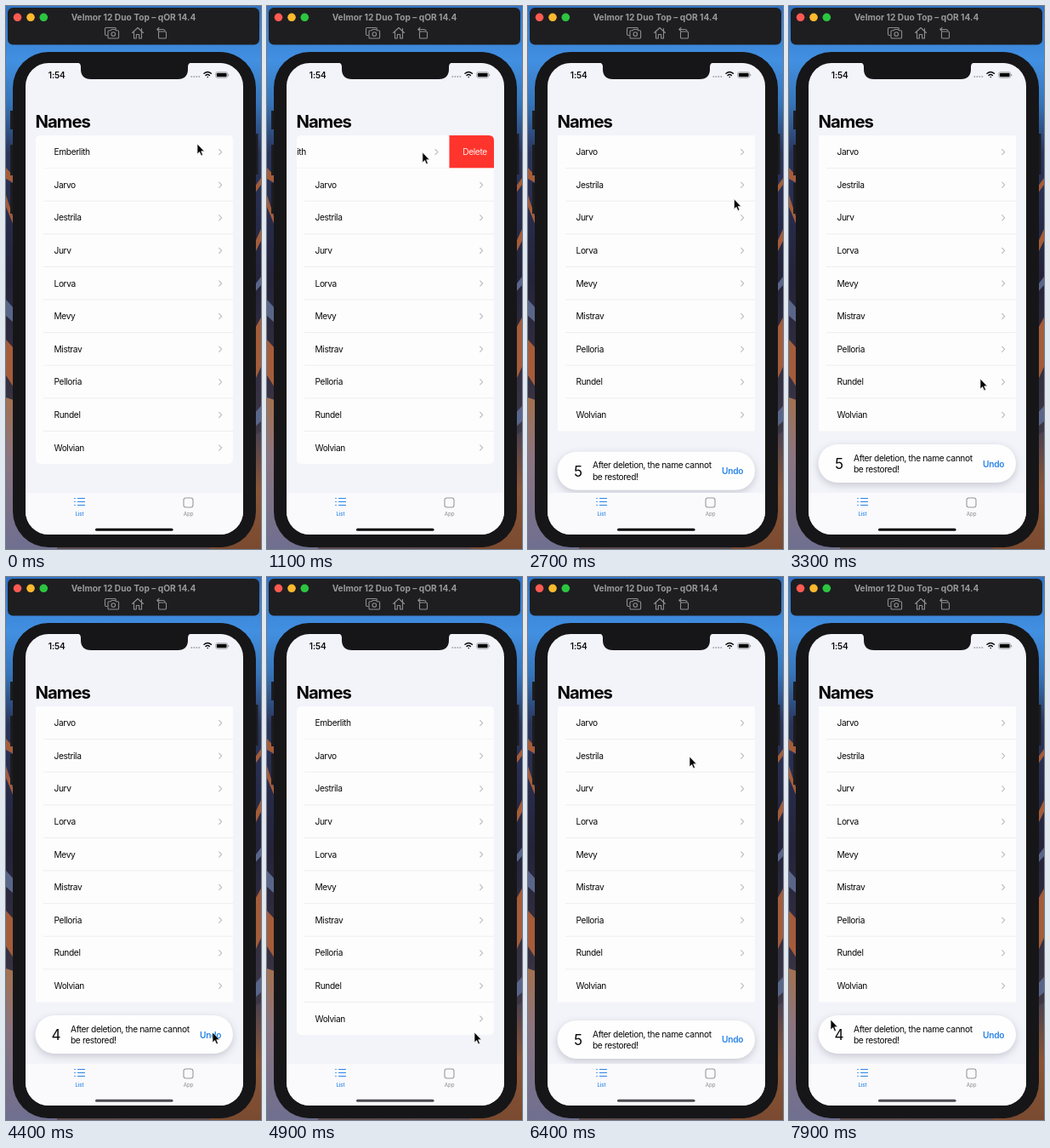
Animation, 300 px wide and 638 px high, one loop 8 s. Source, as an HTML page:

```html
<!DOCTYPE html>
<html lang="en">
<head>
<meta charset="utf-8">
<title>Swipe to delete with undo</title>
<style>
  html, body { margin: 0; width: 100%; height: 100%; overflow: hidden; background: #161618; }
  svg { display: block; width: 100vw; height: 100vh; }
  text { font-family: Inter, "Liberation Sans", sans-serif; }
  .body { font-size: 10.2px; letter-spacing: -.38px; fill: #080808; }
  .bold { font-weight: 600; }
  .line { fill: none; stroke-linecap: round; stroke-linejoin: round; }
</style>
</head>
<body>
<svg viewBox="0 0 300 638" preserveAspectRatio="none">
  <defs>
    <linearGradient id="sky" x2="0" y2="1">
      <stop offset="0" stop-color="#2f74c6"/>
      <stop offset=".1" stop-color="#4290e2"/>
      <stop offset=".18" stop-color="#3674b8"/>
      <stop offset=".27" stop-color="#2a355c"/>
      <stop offset=".5" stop-color="#24233a"/>
      <stop offset=".75" stop-color="#3a3444"/>
      <stop offset="1" stop-color="#5c4a4c"/>
    </linearGradient>
    <linearGradient id="leftGround" x2="0" y2="1">
      <stop offset="0" stop-color="#a3714f"/>
      <stop offset=".4" stop-color="#8b7480"/>
      <stop offset="1" stop-color="#6f6f90"/>
    </linearGradient>
    <linearGradient id="rightGround" x2="0" y2="1">
      <stop offset="0" stop-color="#4a4150"/>
      <stop offset=".5" stop-color="#8a5536"/>
      <stop offset="1" stop-color="#7a4a30"/>
    </linearGradient>
    <clipPath id="screen"><rect x="23" y="67" width="256" height="554" rx="27"/></clipPath>
    <clipPath id="card"><path id="cardShape"/></clipPath>
    <clipPath id="firstRow"><rect id="firstClip" x="35" y="152" width="232"/></clipPath>
    <filter id="soft" x="-20%" y="-50%" width="140%" height="200%"><feGaussianBlur stdDeviation="5"/></filter>
  </defs>

  <!-- desktop -->
  <rect width="300" height="638" fill="url(#sky)"/>
  <path d="M0 460L60 480V638H0z" fill="url(#leftGround)"/>
  <path d="M300 500L240 530V638H300z" fill="url(#rightGround)"/>
  <g fill="#a45c3a">
    <path d="M0 190L9 200V208L0 203zM0 222L9 250V258L0 236zM0 392L9 402V448L0 434z"/>
    <path d="M300 202L290 216V224L300 210zM300 262L290 284V296L300 276zM300 366L290 384V446L300 424z"/>
  </g>
  <path d="M0 345L9 355V372L0 364zM300 318L291 330V338L300 328zM300 470L291 480V496L300 488z" fill="#59668a"/>

  <!-- simulator title bar -->
  <rect x="2" y="2" width="296" height="43.5" rx="6" fill="#1e1e20"/>
  <circle cx="13.5" cy="13.3" r="4.8" fill="#ff5a52"/>
  <circle cx="29" cy="13.3" r="4.8" fill="#fbb92e"/>
  <circle cx="44.3" cy="13.3" r="4.8" fill="#2bc540"/>
  <text x="150" y="17" text-anchor="middle" font-size="10.2" font-weight="700" fill="#98989c">Velmor 12 Duo Top – qOR 14.4</text>
  <g class="line" stroke="#8e8e92" stroke-width="1.1">
    <path d="M119 34.5h-1q-1.5 0-1.5-1.5v-6q0-1.5 1.5-1.5h10q1.5 0 1.5 1.5"/>
    <path d="M120 30q0-1.3 1.3-1.3h2l1-1.2h4l1 1.2h2q1.3 0 1.3 1.3v6.7q0 1.3-1.3 1.3h-10q-1.3 0-1.3-1.3z"/>
    <circle cx="126.3" cy="33" r="2.3"/>
    <path d="M148.5 31.5L155 25.5L161.5 31.5M150.5 30.5V38H153.3V33.5H156.7V38H159.5V30.5M159.5 26.5V29"/>
    <rect x="179.5" y="30" width="9" height="8" rx="1.3"/>
    <path d="M178 27.5h6.5q2 0 2.5 1.5M180 25.3l-2.2 2.2 2.2 2"/>
  </g>

  <!-- phone -->
  <path d="M5 123h5v22H5zM5 163h5v36H5zM5 208h5v36H5zM291 150h5.5v48H291z" fill="#1c1c20"/>
  <rect x="8" y="54" width="286" height="582" rx="42" fill="#161618"/>
  <g clip-path="url(#screen)">
    <rect x="23" y="67" width="256" height="554" fill="#f3f3fa"/>
    <text x="34.5" y="142.5" font-size="20.3" font-weight="700" letter-spacing="-.95" fill="#060606">Names</text>

    <g clip-path="url(#card)">
      <rect x="35" y="152" width="232" height="387" fill="#fdfdfe"/>
      <g id="rows"></g>
      <g id="first" clip-path="url(#firstRow)">
        <rect id="red" y="152" height="38.6" fill="#ff342d"/>
        <text id="delete" class="body" y="175" text-anchor="middle" style="fill:#ffeeec">Delete</text>
        <g id="firstContent"><rect x="35" y="152" width="232" height="38.6" fill="#fdfdfe"/></g>
      </g>
    </g>

    <g id="toast">
      <rect x="34" y="518" width="233" height="45" rx="22.5" fill="#a4a4b0" opacity=".55" filter="url(#soft)"/>
      <rect x="34.5" y="515" width="232.5" height="45" rx="22.5" fill="#fefefe"/>
      <text id="count" x="59" y="544" text-anchor="middle" font-size="17" fill="#080808"></text>
      <text class="body" x="76" y="534.7">After deletion, the name cannot</text>
      <text class="body" x="76" y="548.2">be restored!</text>
      <text class="body bold" x="228" y="541.5" style="fill:#2a84e8;letter-spacing:-.25px">Undo</text>
    </g>

    <rect x="23" y="572" width="256" height="50" fill="#fafafc"/>
    <path class="line" d="M84.5 578.5h8M84.5 582.5h8M84.5 586.5h8M80.7 578.5h.6M80.7 582.5h.6M80.7 586.5h.6" stroke="#2a84e8" stroke-width="1.2"/>
    <text x="86.5" y="599" text-anchor="middle" font-size="6" font-weight="500" fill="#2a84e8">List</text>
    <rect x="209" y="578" width="11" height="11" rx="2.5" fill="none" stroke="#9a9a9e" stroke-width="1.1"/>
    <text x="214.7" y="599" text-anchor="middle" font-size="6" font-weight="500" fill="#9a9a9e">App</text>
    <rect id="home" x="105" y="613.7" width="91.5" height="3" rx="1.5"/>

    <text class="bold" x="49.8" y="84.7" font-size="10" letter-spacing="-.1" fill="#080808">1:54</text>
    <g fill="#a8a8ac">
      <circle cx="218.3" cy="83" r="1"/><circle cx="221.3" cy="83" r="1"/>
      <circle cx="224.3" cy="83" r="1"/><circle cx="227.3" cy="83" r="1"/>
    </g>
    <path class="line" d="M233 79.3q4.2-3.6 8.4 0M235 81.5q2.2-1.9 4.4 0M237.2 83.5h.1" stroke="#080808" stroke-width="1.5"/>
    <rect x="246.7" y="77.7" width="14" height="6.6" rx="1.9" fill="none" stroke="#8a8a8e" stroke-width=".7"/>
    <rect x="247.8" y="78.8" width="11.8" height="4.4" rx="1" fill="#080808"/>
    <path d="M261.7 80v2.2" stroke="#8a8a8e"/>
  </g>
  <path d="M83 66.5h136q-5 0-5 5v2.5q0 12-12 12h-102q-12 0-12-12v-2.5q0-5-5-5z" fill="#161618"/>

  <path id="cursor" d="M0 0V12L2.7 9.5L4.6 13.7L6.5 12.9L4.7 8.7H8.3z" fill="#060606" stroke="#f4f4f6" stroke-width=".7" stroke-linejoin="round"/>
</svg>

<script>
const LOOP = 8000, STEP = 100, ROW = 38.6, TOP = 152, LEFT = 35, RIGHT = 267;
const names = ["Emberlith", "Jarvo", "Jestrila", "Jurv", "Lorva", "Mevy", "Mistrav", "Pelloria", "Rundel", "Wolvian"];
const $ = id => document.getElementById(id);

const rowMarkup = (name, y, divider) => `
  <text class="body" x="56.5" y="${y + 23.2}">${name}</text>
  <path class="line" d="M250.7 ${y + 16.5}l3 3.1-3 3.1" stroke="#bcbcc0" stroke-width="1.1"/>
  ${divider ? `<path d="M44 ${y + ROW}H${RIGHT}" stroke="#c6c6c8" stroke-width=".3"/>` : ""}`;

$("firstContent").innerHTML += rowMarkup(names[0], TOP, true);
$("rows").innerHTML = names.slice(1).map((name, i) =>
  rowMarkup(name, TOP + (i + 1) * ROW, i < names.length - 2)).join("");

// Eased value between [time, value] stops.
function track(stops, t) {
  const next = stops.findIndex(s => s[0] > t);
  if (next === 0) return stops[0][1];
  if (next < 0) return stops[stops.length - 1][1];
  const [t0, a] = stops[next - 1], [t1, b] = stops[next];
  const p = (t - t0) / (t1 - t0);
  return a + (b - a) * p * p * (3 - 2 * p);
}

const swipe = [[600, 0], [1150, 54], [1400, 49], [2300, 49], [2550, 232], [4400, 232], [4401, 0],
  [5500, 0], [6000, 175], [6150, 232]];
const collapse = [[2350, 0], [2700, 1], [4400, 1], [4750, 0], [6050, 0], [6400, 1]];
const cursorPath = [[0, 225, 162], [500, 236, 169], [1150, 182, 172], [1400, 186, 172], [1950, 247, 171],
  [2450, 247, 171], [3300, 225, 438], [3900, 242, 535], [4900, 244, 535], [5500, 232, 162],
  [6000, 59, 159], [6400, 190, 211], [7100, 120, 400], [7900, 49, 520]];
const cursorX = cursorPath.map(([t, x]) => [t, x]);
const cursorY = cursorPath.map(([t, , y]) => [t, y]);
const toasts = [{ start: 2350, end: 4400 }, { start: 6020, end: Infinity }];

function drawList(t) {
  const offset = track(swipe, t), gone = track(collapse, t);
  const bottom = TOP + ROW * (names.length - gone);
  const r = 6 - 4.5 * gone;
  $("cardShape").setAttribute("d", `M${LEFT} ${TOP + r}q0-${r} ${r}-${r}H${RIGHT - r}q${r} 0 ${r} ${r}` +
    `V${bottom - r}q0 ${r}-${r} ${r}H${LEFT + r}q-${r} 0-${r}-${r}z`);
  $("rows").setAttribute("transform", `translate(0 ${-ROW * gone})`);
  $("firstClip").setAttribute("height", ROW * (1 - gone));
  $("firstContent").setAttribute("transform", `translate(${-offset} 0)`);
  $("red").setAttribute("x", RIGHT - offset);
  $("red").setAttribute("width", offset);
  const label = Math.max(244.5, RIGHT - offset + 26) - Math.max(0, offset - 140) * 1.13;
  $("delete").setAttribute("x", label);
}

function drawToast(t) {
  const toast = toasts.find(s => t >= s.start && t < s.end + 400);
  $("toast").style.display = toast ? "" : "none";
  if (!toast) return;
  const enter = Math.min(1, (t - toast.start) / 600);
  const leave = Math.max(0, (t - toast.end) / 400);
  const drop = 120 * ((1 - enter) ** 3 + leave ** 2);
  $("toast").setAttribute("transform", `translate(0 ${drop})`);
  $("count").textContent = 5 - Math.floor((Math.min(t, toast.end) - toast.start) / 1050);
}

function draw(t) {
  drawList(t);
  drawToast(t);
  $("home").setAttribute("fill", t < 4000 ? "#060606" : "#4a4a52");
  $("cursor").setAttribute("transform", `translate(${track(cursorX, t)} ${track(cursorY, t)})`);
}

function tick(now) {
  draw(Math.floor((now % LOOP) / STEP) * STEP);
  requestAnimationFrame(tick);
}
draw(0);
requestAnimationFrame(tick);
</script>
</body>
</html>
```
